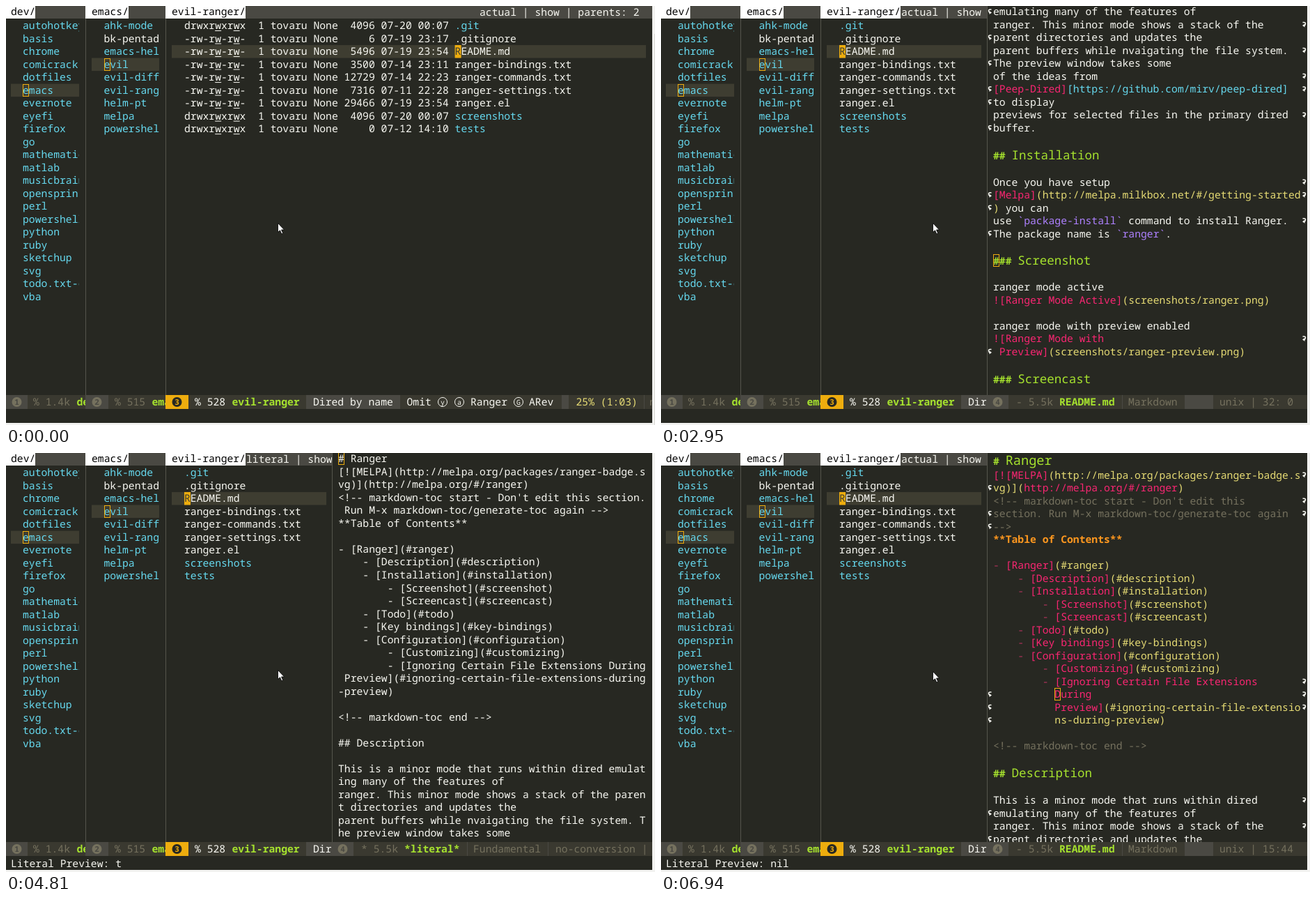
An HTML page that plays this animation: 932 px wide and 601 px high, repeating every 8 s.

```html
<!DOCTYPE html>
<html>
<head>
<meta charset="utf-8">
<style>
html, body { margin: 0; height: 100%; overflow: hidden; background: #272822; }
svg { display: block; }
text {
  font: 14.72px "Noto Sans Mono", "DejaVu Sans Mono", monospace;
  white-space: pre; text-rendering: geometricPrecision;
}
.b { font-weight: bold; }
</style>
</head>
<body>
<svg id="stage" width="932" height="601" viewBox="0 0 932 601"></svg>
<script>
const CELL = 8.832, ROW = 18.52;
const BG = '#272822', FG = '#f8f8f2', DARK = '#3a3930', LIGHT = '#4a4943', HL = '#3e3d31';
const GOLD = '#eead0e', DIM = '#75715e', GREEN = '#a6e22e', CYAN = '#66d9ef', YELLOW = '#e6db74';
const INK = { p: '#f92672', y: YELLOW, c: CYAN, g: DIM, o: '#fd971f', v: '#ae81ff', d: '#b0345c' };

const README = `1# Ranger
r{p:[![MELPA]}{y:(http://melpa.org/packages/ranger-badge.s}
l{y:vg)](}{p:http://melpa.org/#/ranger}{y:)}
r{g:<!-- markdown-toc start - Don't edit this}
b{g:section. Run M-x markdown-toc/generate-toc again}
l{g:-->}
 {o:**Table of Contents**}

 {d:-} {p:[Ranger]}{y:(#ranger)}
     {d:-} {p:[Description]}{y:(#description)}
     {d:-} {p:[Installation]}{y:(#installation)}
         {d:-} {p:[Screenshot]}{y:(#screenshot)}
         {d:-} {p:[Screencast]}{y:(#screencast)}
     {d:-} {p:[Todo]}{y:(#todo)}
     {d:-} {p:[Key bindings]}{y:(#key-bindings)}
     {d:-} {p:[Configuration]}{y:(#configuration)}
         {d:-} {p:[Customizing]}{y:(#customizing)}
r        {d:-} {p:[Ignoring Certain File Extensions}
b          {p:During}
b          {p:Preview]}{y:(#ignoring-certain-file-extensio}
l          {y:ns-during-preview)}

 {g:<!-- markdown-toc end -->}

2## Description

rThis is a minor mode that runs within dired
lemulating many of the features of
rranger. This minor mode shows a stack of the
lparent directories and updates the`;

const README_DOWN = `lemulating many of the features of
rranger. This minor mode shows a stack of the
lparent directories and updates the
rparent buffers while nvaigating the file system.
lThe preview window takes some
rof the ideas from
b{p:[Peep-Dired]}{c:[https://github.com/mirv/peep-dired]}
lto display
rpreviews for selected files in the primary dired
lbuffer.

2## Installation

rOnce you have setup
b{p:[Melpa]}{y:(http://melpa.milkbox.net/#/getting-started}
l{y:)} you can
ruse {v:\`package-install\`} command to install Ranger.
lThe package name is {v:\`ranger\`}.

3### Screenshot

 ranger mode active
 {p:![Ranger Mode Active]}{y:(screenshots/ranger.png)}

 ranger mode with preview enabled
r{p:![Ranger Mode with}
l{p: Preview]}{y:(screenshots/ranger-preview.png)}

3### Screencast`;

const LITERAL = ` # Ranger
 [![MELPA](http://melpa.org/packages/ranger-badge.s
 vg)](http://melpa.org/#/ranger)
 <!-- markdown-toc start - Don't edit this section.
  Run M-x markdown-toc/generate-toc again -->
 **Table of Contents**

 - [Ranger](#ranger)
     - [Description](#description)
     - [Installation](#installation)
         - [Screenshot](#screenshot)
         - [Screencast](#screencast)
     - [Todo](#todo)
     - [Key bindings](#key-bindings)
     - [Configuration](#configuration)
         - [Customizing](#customizing)
         - [Ignoring Certain File Extensions During
  Preview](#ignoring-certain-file-extensions-during
 -preview)

 <!-- markdown-toc end -->

 ## Description

 This is a minor mode that runs within dired emulat
 ing many of the features of
 ranger. This minor mode shows a stack of the paren
 t directories and updates the
 parent buffers while nvaigating the file system. T
 he preview window takes some`;

const LITERAL_DOWN = `
 This is a minor mode that runs within dired emulat
 ing many of the features of
 ranger. This minor mode shows a stack of the paren
 t directories and updates the
 parent buffers while nvaigating the file system. T
 he preview window takes some
 of the ideas from [Peep-Dired][https://github.com/
 mirv/peep-dired] to display
 previews for selected files in the primary dired b
 uffer.

 ## Installation

 Once you have setup [Melpa](http://melpa.milkbox.n
 et/#/getting-started) you can
 use \`package-install\` command to install Ranger. T
 he package name is \`ranger\`.

 ### Screenshot

 ranger mode active
 ![Ranger Mode Active](screenshots/ranger.png)

 ranger mode with preview enabled
 ![Ranger Mode with Preview](screenshots/ranger-pre
 view.png)

 ### Screencast`;

const DIRS = `autohotkey basis chrome comicrack dotfiles emacs evernote eyefi firefox go mathematic
matlab musicbrain opensprin perl powershell python ruby sketchup svg todo.txt-c vba`.split(/\s/);
const SUBDIRS = 'ahk-mode bk-pentad emacs-hel evil evil-diff evil-rang helm-pt melpa powershel'.split(' ');
const FILES = `d 4096 07-20 00:07 .git
- 6 07-19 23:17 .gitignore
- 5496 07-19 23:54 README.md
- 3500 07-14 23:11 ranger-bindings.txt
- 12729 07-14 22:23 ranger-commands.txt
- 7316 07-11 22:28 ranger-settings.txt
- 29466 07-19 23:54 ranger.el
d 4096 07-20 00:07 screenshots
d 0 07-12 14:10 tests`.split('\n').map(l => l.split(' '));

const esc = s => s.replace(/&/g, '&amp;').replace(/</g, '&lt;');
const rect = (x, y, w, h, fill) => `<rect x="${x}" y="${y}" width="${w}" height="${h}" fill="${fill}"/>`;
const raw = (x, y, s, fill = FG, cls = '') => `<text x="${x}" y="${y}" fill="${fill}" class="${cls}">${s}</text>`;
const text = (x, y, s, fill, cls) => raw(x, y, esc(s), fill, cls);
const hollow = (x, y) =>
  `<rect x="${x + .5}" y="${y + .5}" width="8" height="17" fill="none" stroke="${GOLD}"/>`;
const clip = (x, w, body) =>
  `<svg x="${x}" width="${w}" height="601" viewBox="${x} 0 ${w} 601">${body}</svg>`;
const rowY = i => 33 + ROW * i;
const bar = i => 19 + ROW * i;

function column(x, title, width, body) {
  const label = title.length * CELL + 9;
  return clip(x, width, rect(x, 0, width, 18, LIGHT) + rect(x, 0, label, 18, '#fff') +
    text(x + 9, 13, title, '#000') + body);
}

function badge(x, w, n, on) {
  const cx = x + w / 2, fill = on ? GOLD : LIGHT;
  return rect(x, 558, w, 20, fill) +
    `<circle cx="${cx}" cy="568" r="7" fill="${on ? BG : DIM}"/>` +
    `<text x="${cx}" y="572" fill="${fill}" text-anchor="middle" class="b" style="font-size:11px">${n}</text>`;
}

const ring = (x, c) => `<circle cx="${x}" cy="568" r="6.5" fill="none" stroke="${FG}"/>` +
  `<text x="${x}" y="571.5" fill="${FG}" text-anchor="middle" style="font-size:10px">${c}</text>`;

const parents =
  clip(0, 105, rect(7, bar(5), 98, 18.5, HL) +
    DIRS.map((d, i) => text(24, rowY(i), d, CYAN)).join('') + hollow(24, 112)) +
  clip(0, 114, rect(0, 0, 114, 18, LIGHT) + rect(0, 0, 42, 18, '#fff') + text(7, 13, 'dev/', '#000') +
    rect(0, 558, 114, 20, DARK) + badge(0, 31, 1) + text(39, 573, '% 1.4k', DIM) +
    text(101.5, 573, 'dev', GREEN, 'b')) +
  clip(114, 106, rect(123, bar(3), 97, 18.5, HL) +
    SUBDIRS.map((d, i) => text(140.5, rowY(i), d, i == 1 ? FG : CYAN)).join('') + hollow(141, 75)) +
  column(114, 'emacs/', 115, rect(114, 558, 115, 20, DARK) + badge(114, 33, 2) +
    text(156, 573, '% 515', DIM) + text(209.5, 573, 'emacs', GREEN, 'b')) +
  rect(114, 18, 1, 540, '#55554c');

function files(wide) {
  const width = wide ? 699 : 239, nameX = wide ? 256 + 44 * CELL : 256;
  let s = rect(238, bar(2), wide ? 681 : 222, 18.5, HL);
  FILES.forEach(([kind, size, day, time, name], i) => {
    const y = rowY(i), dir = kind == 'd';
    if (wide) {
      const perm = dir ? 'drwxrwxrwx' : '-rw-rw-rw-';
      s += text(256, y, `${perm}  1 tovaru None ${size.padStart(5)} ${day} ${time}`);
      for (const c of [5, 8]) s += rect(256 + c * CELL, y + 2, 9, 1, FG);
    }
    if (i == 2) s += rect(nameX, bar(2), 9, 18.5, GOLD);
    s += raw(nameX, y, i == 2 ? `<tspan fill="${HL}">R</tspan>EADME.md` : name, dir ? CYAN : FG);
  });
  s += rect(229, 558, width, 20, DARK) + badge(229, 33, 3, true) + text(271, 573, '% 528') +
    text(324.5, 573, 'evil-ranger', GREEN, 'b') + rect(431, 558, 135, 20, LIGHT) + text(441, 573, 'Dired by name');
  if (wide) s += text(680, 14, 'actual | show | parents: 2') + text(575.5, 573, 'Omit') +
    ring(627, 'y') + ring(651, 'a') + text(667, 573, 'Ranger') + ring(736, 'G') + text(751, 573, 'ARev') +
    rect(798, 558, 10, 20, LIGHT) + text(818.5, 573, '25% (1:03)', YELLOW) +
    rect(916, 558, 1, 20, LIGHT) + text(924, 573, 'n', DIM);
  return column(229, 'evil-ranger/', width, s) + rect(229, 18, 1, 540, '#55554c');
}

const fringe = (x, y, dir) => `<g transform="translate(${x},${y}) scale(${dir},1)">` +
  `<path d="M-2 -3h2q2 0 2 2t-2 2.5" fill="none" stroke="${FG}" stroke-width="1.5"/>` +
  `<path d="M-2.5 1.5l3.5 -2.5v5z" fill="${FG}"/></g>`;

const paint = s => esc(s).replace(/\{(\w):(.*?)\}/g, (_, k, t) =>
  `<tspan fill="${INK[k]}"${k == 'o' ? ' class="b"' : ''}>${t}</tspan>`);

function preview({ doc, cursor: [col, line], literal, pos }) {
  let y = doc == README ? 0 : -1, s = '';
  doc.split('\n').forEach((l, i) => {
    const flag = l[0] || ' ', body = l.slice(1), level = +flag;
    const h = level ? [22.2, 22, 21][level - 1] : ROW;
    if (level) {
      const size = level == 1 ? 18.6 : 17.5;
      s += raw(477, y + 17, `<tspan class="b">${body.slice(0, level)}</tspan> ` +
        `<tspan style="font-size:${size}px">${body.slice(level + 1)}</tspan>`, GREEN);
    } else s += raw(477, y + 14.3, paint(body));
    if ('rb'.includes(flag)) s += fringe(923.5, y + 9, 1);
    if ('lb'.includes(flag)) s += fringe(472.5, y + 9, -1);
    if (i == line) s += hollow(Math.round(477 + col * CELL), Math.round(y + (level ? 2 : 0)));
    y += h;
  });
  s += rect(468, 0, 1, 558, '#55554c') + rect(468, 558, 460, 20, DARK) + badge(468, 31, 4) +
    text(510, 573, (literal ? '*' : '-') + ' 5.5k', DIM) +
    text(572, 573, literal ? '*literal*' : 'README.md', GREEN, 'b') + rect(662, 558, 1, 20, LIGHT);
  s += literal
    ? text(671, 573, 'Fundamental', DIM) + rect(778, 558, 1, 20, LIGHT) + text(789, 573, 'no-conversion |', DIM)
    : text(671, 573, 'Markdown', DIM) + rect(752, 558, 41, 20, LIGHT) + text(802, 573, 'unix | ' + pos, DIM);
  return clip(468, 460, s) + clip(344, 124, text(345, 14, (literal ? 'literal' : 'actual') + ' | show'));
}

const top44 = { doc: README, cursor: [10, 18], pos: '15:44' };
const SCENES = [
  { at: 0 },
  { at: 1340, doc: README, cursor: [10, 19], pos: '15:51' },
  { at: 2950, doc: README_DOWN, cursor: [0, 19], pos: '32: 0' },
  { at: 3220, ...top44 },
  { at: 4810, doc: LITERAL, cursor: [0, 0], literal: true, echo: 'Literal Preview: t' },
  { at: 5900, doc: LITERAL_DOWN, cursor: [0, 5], literal: true },
  { at: 6170, doc: LITERAL, cursor: [0, 24], literal: true },
  { at: 6940, ...top44, echo: 'Literal Preview: nil' }
];

const stage = document.getElementById('stage');
stage.innerHTML = rect(0, 0, 932, 601, BG) + parents +
  SCENES.map(s => `<g class="scene">${files(!s.doc)}${s.doc ? preview(s) : ''}` +
    `${s.echo ? text(7, 594, s.echo) : ''}</g>`).join('') +
  rect(928, 0, 4, 601, '#f2f2f0') + rect(0, 598, 932, 3, '#f2f2f0') +
  `<g id="edge">${rect(931, 40, 1, 561, '#d8d8d4')}</g>` +
  '<path id="mouse" d="M390.5 311.5v13l3 -2.7 2.2 5 2 -.9 -2.2 -4.9h4z" fill="#fff" stroke="#000" stroke-width=".8"/>';
const scenes = stage.querySelectorAll('.scene');
const edge = document.getElementById('edge'), mouse = document.getElementById('mouse');

const start = performance.now();
function draw(now) {
  const t = Math.max(0, now - start) % 8000;
  const current = SCENES.filter(s => s.at <= t).length - 1;
  scenes.forEach((g, i) => g.setAttribute('display', i == current ? 'inline' : 'none'));
  edge.setAttribute('display', t < 2140 ? 'inline' : 'none');
  mouse.setAttribute('transform', `translate(0,${t < 6670 ? 0 : 2})`);
  requestAnimationFrame(draw);
}
draw(start);
</script>
</body>
</html>
```
